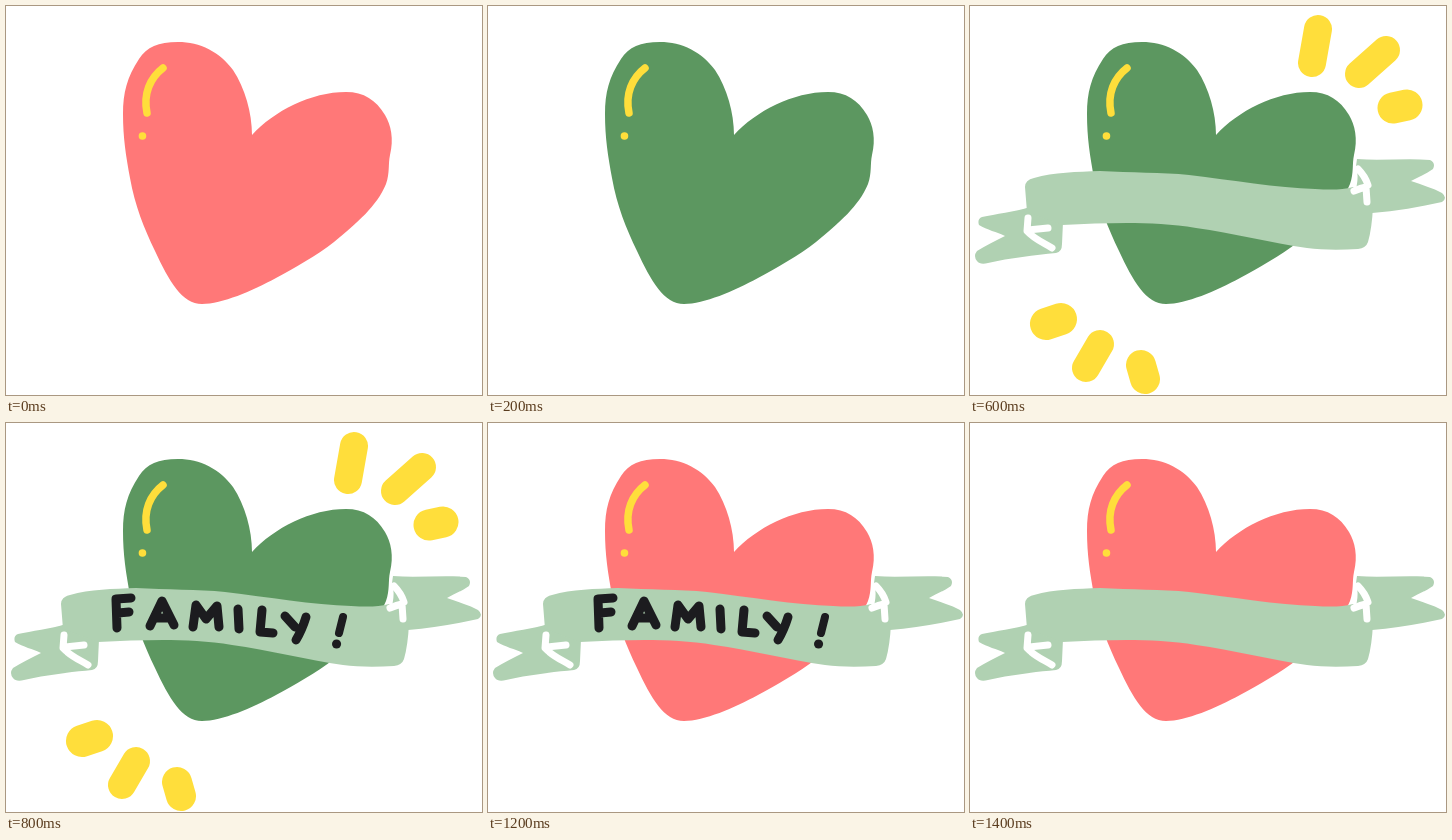
Recreate the animation shown at these times as an HTML page. Size 476 px wide and 389 px high, loop 1600 ms.

```html
<!DOCTYPE html>
<html lang="en">
<head>
<meta charset="utf-8">
<title>Family heart</title>
<style>
  html, body { margin: 0; width: 100%; height: 100%; overflow: hidden; background: #fff; }
  svg { display: block; width: 100vw; height: 100vh; }
  .line { fill: none; stroke-linecap: round; stroke-linejoin: round; }
</style>
</head>
<body>
<svg viewBox="0 0 476 389" role="img" aria-label="FAMILY !">
  <path id="heart" d="M246 129C246 107 239 82 227 64C214 46 194 36 172 36C152 36 141 41 133 53C121 71 117 87 117 108C117 132 120 150 124 172C129 200 138 222 149 245C163 275 176 298 196 298C216 298 246 285 270 272C288 262 310 250 328 236C351 217 371 200 380 178C384 167 382 158 384 149C388 133 385 119 379 109C370 94 358 86 340 86C305 86 268 105 246 129Z"/>
  <g class="line" stroke="#ffde3b" stroke-width="7.5">
    <path d="M157 62C144 72 137 88 141 107"/>
    <path d="M136.400 130h.1"/>
  </g>

  <g id="ribbon">
    <g fill="#b0d1b2">
      <path d="M60 201C45 206 25 208 12 211Q7 213 9 219C17 224 27 226 35 230C25 235 15 240 7 245Q3 250 7 255Q10 259 18 257C40 252 65 249 86 247Q92 246 92 238L93 216Z"/>
      <path d="M387 153C410 155 437 152 460 154Q466 157 463 163C456 168 448 171 441 175C452 179 463 182 472 187Q478 192 472 196C450 201 426 205 402 207L384 190Q390 172 386 160Z"/>
      <path d="M55 181Q55 174 64 172C84 166 107 166 130 165C160 167 192 166 219 169C262 174 307 182 345 183C361 184 372 184 383 181L403 200Q402 222 398 236Q396 242 388 243C370 244 352 244 337 242C302 237 262 227 226 222C181 215 140 217 92 219L57 206Z"/>
    </g>
    <g class="line" stroke="#fff" stroke-width="7">
      <path d="M58 212L57 225C64 233 74 237 82 242M58 224L78 222"/>
      <path d="M388 163C393 168 396 173 398 179M384 185Q391 182 396 181L397 196"/>
    </g>
  </g>

  <g id="rays" class="line" stroke="#ffde3b"></g>

  <g id="word" class="line" stroke="#1c1c1f" stroke-width="9">
    <path d="M125 175L110 176L111 205M112 190L123 189"/>
    <path d="M144 203L156 178L168 202M149 195L164 195"/>
    <path d="M187 204L190 182L200 196L211 183L213 204"/>
    <path d="M232 186L233 206"/>
    <path d="M256 187L254 209L267 210"/>
    <path d="M279 193L289 204M300 194Q296 207 290 217"/>
    <path d="M337 194L333 210" stroke-width="8"/>
    <path d="M330.500 221h.1"/>
  </g>
</svg>
<script>
const RED = '#ff7878', GREEN = '#5c9760';
const LOOP = 1600, STEP = 200;
const el = id => document.getElementById(id);

// x1, y1, x2, y2, thickness
const rays = [
  [348, 23, 342, 57, 28], [416, 44, 389, 68, 28], [437, 99, 423, 102, 31],
  [91, 313, 76, 318, 32], [130, 338, 116, 362, 28], [171, 359, 175, 373, 30]
];
for (const [x1, y1, x2, y2, width] of rays) {
  const ray = document.createElementNS('http://www.w3.org/2000/svg', 'path');
  ray.setAttribute('d', `M${x1} ${y1}L${x2} ${y2}`);
  ray.setAttribute('stroke-width', width);
  el('rays').append(ray);
}

const show = (id, on) => { el(id).style.display = on ? '' : 'none'; };
const within = (n, first, last) => n >= first && n <= last;

// Build up in green, then take apart in red.
function draw(time) {
  const step = Math.floor((time % LOOP) / STEP);
  el('heart').setAttribute('fill', within(step, 1, 4) ? GREEN : RED);
  show('ribbon', step >= 2);
  show('rays', within(step, 3, 5));
  show('word', within(step, 4, 6));
}

let start;
function tick(now) {
  start ??= now;
  draw(now - start);
  requestAnimationFrame(tick);
}
draw(0);
requestAnimationFrame(tick);
</script>
</body>
</html>
```
